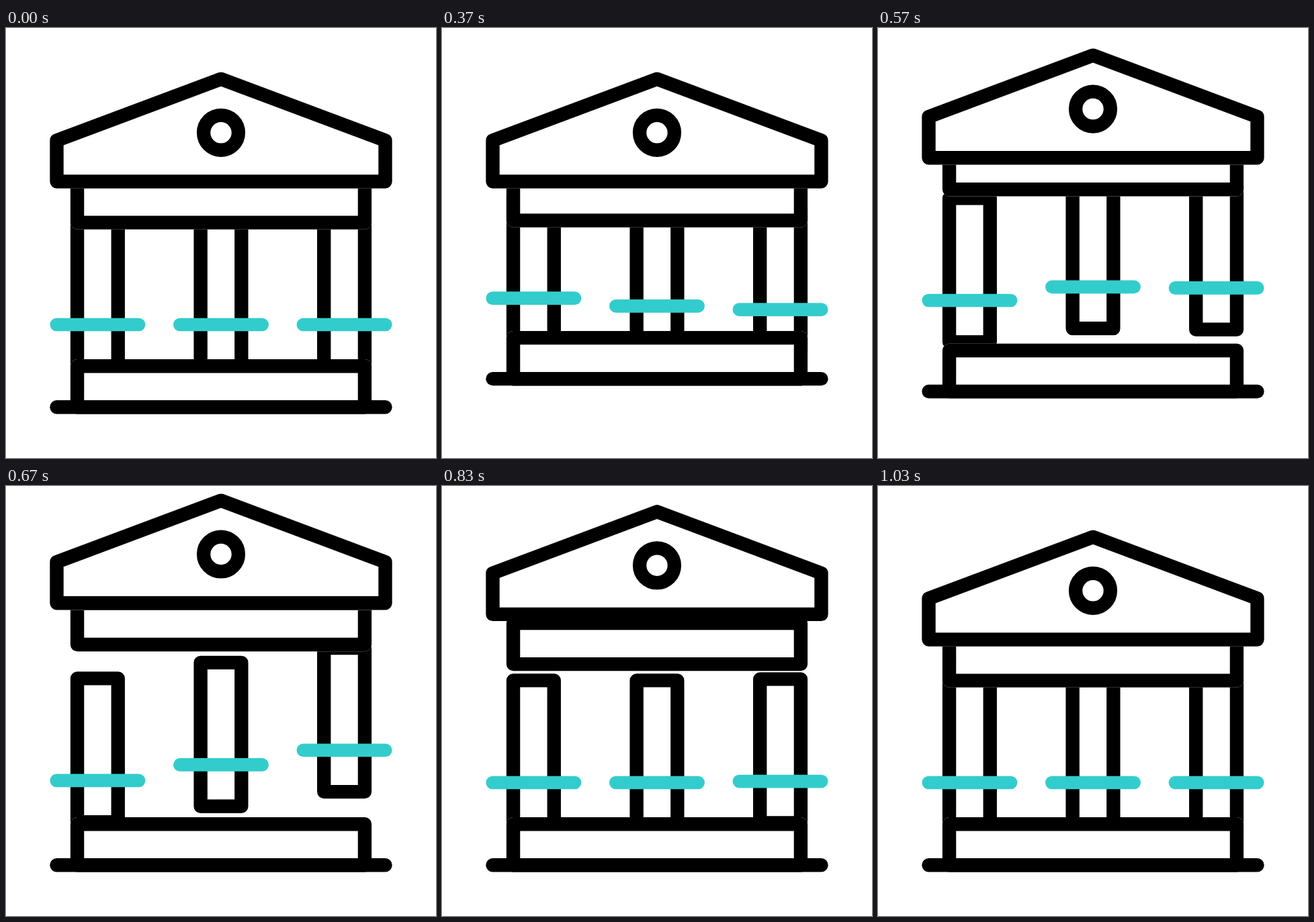
Recreate the animation shown at these times as an HTML page with a canvas. Size 640 by 640 pixels, loop 1.67 s.

```html
<!DOCTYPE html>
<html lang="en">
<head>
<meta charset="utf-8">
<title>Bank icon</title>
<style>
  html, body { margin: 0; width: 100%; height: 100%; overflow: hidden; background: #fff; }
  canvas { display: block; width: 100vw; height: 100vh; }
</style>
</head>
<body>
<canvas id="stage" width="640" height="640"></canvas>
<script>
const ctx = document.getElementById('stage').getContext('2d');
const LOOP = 1670, START = 200, STEP = 100 / 3;
const U = 489 / 8;            // grid unit
const LEFT = 75.5, RIGHT = 564.5;
const COLUMN = 60.7;          // column width between stroke centres
const INK = '#000', TEAL = '#33cccc';

// Each part hops up by `lift` px: leaves, peaks and lands at these times (ms).
const hops = {
  base:  { lift: 54.5, from: 183, peak: 449, to: 663 },
  left:  { lift: 57,   from: 183, peak: 475, to: 698 },
  mid:   { lift: 56.5, from: 181, peak: 557, to: 768 },
  right: { lift: 56,   from: 183, peak: 607, to: 862 },
  beam:  { lift: 55.2, from: 322, peak: 628, to: 1010 },
  roof:  { lift: 56.2, from: 374, peak: 703, to: 1041 }
};

const ease = u => {
  u = Math.min(1, Math.max(0, u));
  return u * u * (3 - 2 * u);
};

function offset({ lift, from, peak, to }, t) {
  return -lift * (t < peak ? ease((t - from) / (peak - from)) : 1 - ease((t - peak) / (to - peak)));
}

// Motion advances thirty times a second, on a 10 ms clock.
function snap(t) {
  if (t < START) return 0;
  const k = Math.floor((Math.floor(t / 10) * 10 - START + 5) / STEP);
  return k >= 25 ? LOOP : START + k * STEP;
}

function outline(path) {
  ctx.fillStyle = ctx.strokeStyle = '#fff';
  ctx.fill(path);
  ctx.stroke(path);
  ctx.strokeStyle = INK;
  ctx.stroke(path);
}

function box(x, y, w, h) {
  const p = new Path2D();
  p.rect(x, y, w, h);
  outline(p);
}

function bar(x1, x2, y, color) {
  ctx.strokeStyle = color;
  ctx.beginPath();
  ctx.moveTo(x1, y);
  ctx.lineTo(x2, y);
  ctx.stroke();
}

function column(i) {
  const x = LEFT + U / 2 + i * (7 * U - COLUMN) / 2;
  box(x, 289.4, COLUMN, 3.5 * U);
  ctx.lineWidth = 19.7;
  const mid = x + COLUMN / 2;
  bar(mid - U, mid + U, 441.5, TEAL);
}

function roof() {
  const p = new Path2D();
  p.moveTo(320, 75.9);
  p.lineTo(RIGHT, 167.4);
  p.lineTo(RIGHT, 228.5);
  p.lineTo(LEFT, 228.5);
  p.lineTo(LEFT, 167.4);
  p.closePath();
  outline(p);
  ctx.beginPath();
  ctx.arc(320, 155.8, 25.9, 0, 2 * Math.PI);
  ctx.stroke();
}

function base() {
  box(LEFT + U / 2, 503.2, 7 * U, U);
  bar(LEFT, RIGHT, 564.2, INK);
}

const parts = [
  ['left', () => column(0)],
  ['mid', () => column(1)],
  ['right', () => column(2)],
  ['base', base],
  ['beam', () => box(LEFT + U / 2, 228.5, 7 * U, U)],
  ['roof', roof]
];

function draw(t) {
  ctx.fillStyle = '#fff';
  ctx.fillRect(0, 0, 640, 640);
  ctx.lineWidth = U / 3;
  ctx.lineCap = ctx.lineJoin = 'round';
  for (const [name, paint] of parts) {
    ctx.save();
    ctx.translate(0, offset(hops[name], t));
    paint();
    ctx.restore();
  }
}

const begin = performance.now();
function tick() {
  draw(snap((performance.now() - begin) % LOOP));
  requestAnimationFrame(tick);
}
tick();
</script>
</body>
</html>
```
